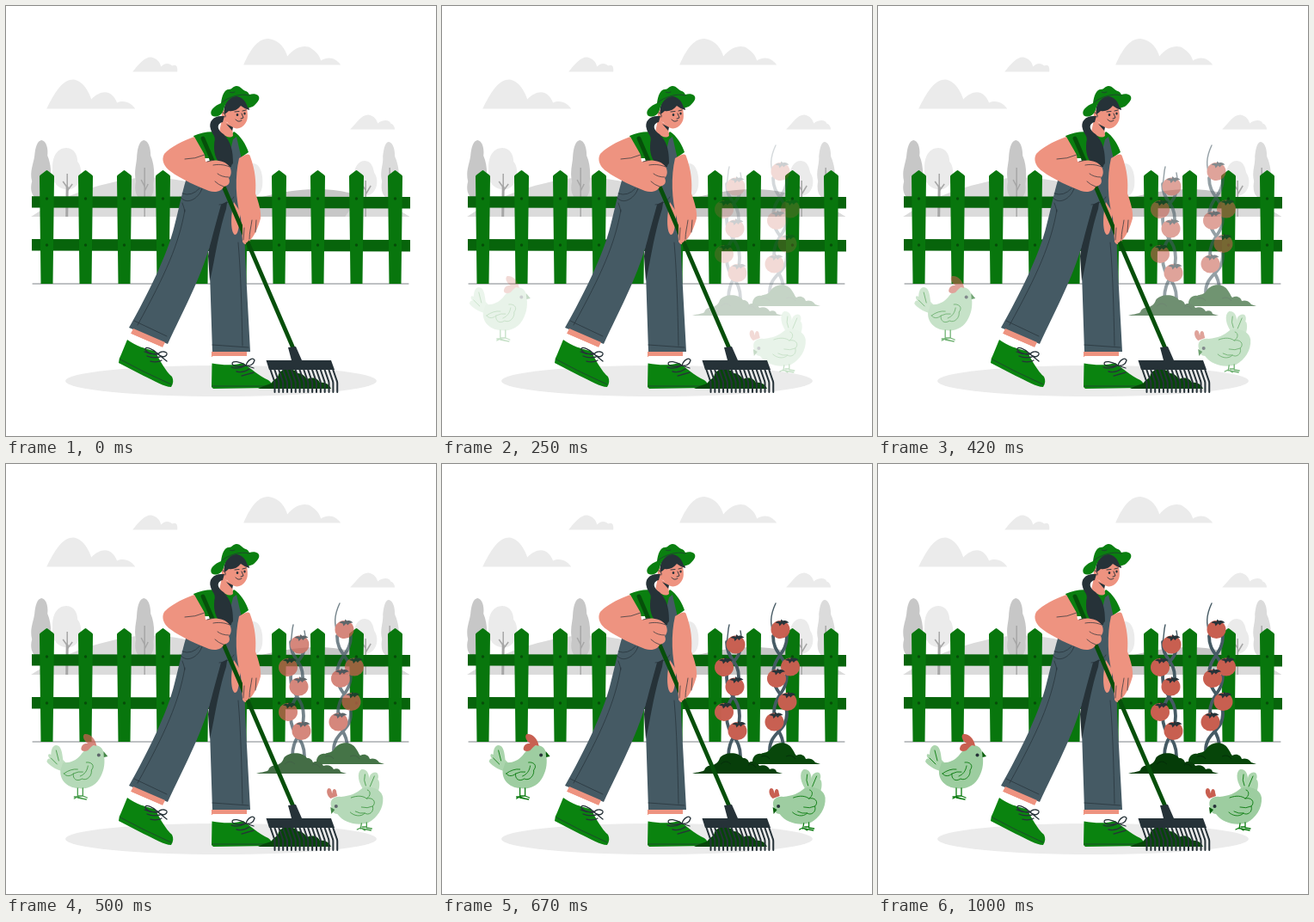
Recreate the animation shown at these times as an HTML page. Size 500 by 500 pixels, loop 1.04 s.

```html
<!DOCTYPE html>
<html lang="en">
<head>
<meta charset="utf-8">
<title>Gardener</title>
<style>
  html, body { margin: 0; width: 100%; height: 100%; overflow: hidden; background: #fff; }
  svg { display: block; width: 100%; height: 100%; }
  .line { fill: none; stroke: #263238; stroke-linecap: round; stroke-linejoin: round; }
  .wing { fill: none; stroke: #087a0d; stroke-linecap: round; stroke-linejoin: round; }
</style>
</head>
<body>
<svg viewBox="0 0 500 500">
  <defs>
    <g id="picket">
      <path fill="#08760d" d="M-8.500 198.500Q-8.500 197.200-7.500 196.500L-1 191.400Q0 190.700 1 191.400L7.500 196.500Q8.500 197.200 8.500 198.500L7 323H-7Z"/>
      <g fill="#064d09"><circle cy="224" r="1.700"/><circle cy="278" r="1.700"/></g>
    </g>
    <g id="tomato">
      <ellipse rx="11" ry="10.500" fill="#c85f50"/>
      <path fill="#263238" d="M-6-8C-4-10-1-10.500 0-9L1-12L3-10C6-11 8-10 10-8C7-8 5-7 4-5L2-7L-1-4L-2-7Z"/>
    </g>
  </defs>

  <g id="clouds" fill="#ebebeb" transform="translate(-.8 .4)">
    <path d="M48 119C57 101 66 85 79 85C90 86 97 99 100 108C108 100 117 97 124 103C128 107 129 110 130 112C139 108 147 113 151 119Z"/>
    <path d="M148 76C155 67 162 59 169 59C176 60 180 65 181 70C186 65 191 66 194 69Q201 66 200 76Z"/>
    <path d="M277 68C284 52 293 37 306 37.500C319 39 326 50 328 58C337 47 349 44 356 49C364 54 366 60 367 63C377 57 385 61 390 68Z"/>
    <path d="M401 143C409 135 414 126 422 126C429 127 432 132 433 136C440 131 447 132 448 136Q452 137 453 143Z"/>
  </g>

  <g id="landscape" transform="translate(-.8 0)">
    <g fill="#ebebeb">
      <path d="M71 165C81 165 84 175 84 181C91 188 89 210 76 213C62 215 53 205 55 190C54 176 60 165 71 165Z"/>
      <path d="M288 183C296 183 300 195 299 208C298 219 291 224 283 222L275 190Z"/>
      <path d="M418 180C426 180 428 189 429 194C435 202 433 218 420 221C407 222 403 210 406 198C405 187 411 180 418 180Z"/>
    </g>
    <path fill="#dbdbdb" d="M30 245C60 225 90 213 121 206C150 198 175 197 205 203L280 220L300 245Z"/>
    <path fill="#c7c7c7" d="M290 224C315 218 335 213 362 213C390 213 410 218 430 229L470 245H270Z"/>
    <path fill="#dbdbdb" d="M400 238C420 224 442 226 470 245H395Z"/>
    <g fill="#c7c7c7">
      <path d="M42 156C48 157 50 166 49 174C53 183 54 196 52 207C54 220 48 225 41 225C32 225 28 215 31 204C28 192 33 183 34 174C35 164 37 157 42 156Z"/>
      <path d="M161 156C167 157 169 166 169 174C173 183 174 196 172 207C174 220 168 225 161 225C153 225 149 215 152 204C149 192 153 183 153 174C154 164 156 157 161 156Z"/>
      <path fill="#dbdbdb" d="M446 158C451 159 453 167 453 175C457 184 459 196 457 207C458 220 453 224 447 224C439 224 436 214 438 204C435 192 440 184 439 175C440 165 442 158 446 158Z"/>
    </g>
    <g fill="none" stroke="#a6a6a6" stroke-width="1.500">
      <path stroke-width="3" d="M71.500 245L72 210"/><path d="M72 228V195M72 215L78 207M72 211L67 204"/>
      <path d="M162 245V188M162 215L166 207M162 210L158 202M419 245V203M419 219L425 209M419 214L414 207M447 245V188"/>
    </g>
  </g>

  <g id="fence">
    <path fill="#07640b" d="M30 221.300L470 222V235.500L30 234.500ZM30 271L470 272V285.500L30 284.500Z"/>
    <path class="line" stroke-width=".6" d="M31 323H468"/>
  </g>

  <ellipse cx="250" cy="436" rx="181" ry="18" fill="#ebebeb"/>

  <g id="plants">
    <g fill="none" stroke="#455a64" stroke-linecap="round">
      <path id="stems" stroke-width="3.800"/>
      <path stroke-width="1.400" d="M388 162C381 177 382 186 385 197M334 187C332 194 333 199 331 207M347 212Q349 203 347 194"/>
    </g>
    <g id="soil" fill="#053c08">
      <path d="M352 349C355 347 359 347 361 346C361 340 366 336 371 337C375 335 379 336 382 331C388 322 402 322 407 331C410 335 410 337 412 339C417 336 422 339 423 343C429 341 433 345 434 347L440 349Z" fill="#064509"/>
      <path d="M291 360C298 358 303 358 305 356C306 352 310 350 314 351C318 348 321 348 323 342C328 335 344 334 350 342C354 342 356 344 357 347C362 344 368 348 369 351C374 349 379 351 381 355C386 353 389 356 389 358L396 360Z"/>
      <path fill="none" stroke="#03280a" stroke-width=".7" d="M371 340Q378 338 381 343M400 340Q407 337 411 343M324 349Q330 343 336 349M356 350Q361 347 365 353"/>
    </g>
  </g>

  <g id="hen">
    <path fill="#abd5ad" d="M78 358C70 358 58 351 55 346C56 342 58 342 59 343C55 339 57 336 60 338C60 332 62 327 66 327C72 327 73 336 74 344L80 350Z"/>
    <path fill="#9dcda0" d="M74 347C81 348 89 345 94 339C99 332 105 327 112 327C118 328 121 332 121.500 337C123 347 122 355 118 363C113 374 102 379 91 377C78 376 70 367 71 356Z"/>
    <path fill="#c85f50" d="M95 331C96 325 100 325 103 325C98 322 96 316 99 314C105 313 112 319 113 328C108 326 107 329 103 333C99 335 95 334 95 331Z"/>
    <path fill="#065f0a" d="M121 334L126 340L121.500 341Z"/>
    <circle cx="115.500" cy="338.500" r="2" fill="#263238"/>
    <path class="wing" stroke-width=".9" d="M75 360C78 364 83 363 86 360C85 366 90 370 96 366C102 369 108 362 107 356C112 350 106 346 101 347M75 360Q83 354 91 355M86 360Q92 357 97 358M66 333L69 345M60 342L67 349M103 351C102 357 99 361 94 363"/>
    <path class="wing" stroke="#065f0a" stroke-width="1.300" d="M91 377L91 387M97 377L97 386M87 389L91 387L97 389M91 387L87 387M91 388L101 390M97 386L102 388M97 386L92 386"/>
  </g>

  <g id="pecker">
    <path fill="#abd5ad" d="M425 381C417 371 415 359 421 355C427 354 430 360 430 366C430 360 436 357 439 359C441 361 441 364 440 367C443 368 443 380 437 388Z"/>
    <path fill="#9dcda0" d="M386 399C383 390 390 386 397 387C408 386 415 383 422 377C433 373 445 379 446 388C447 400 439 412 429 417C417 421 401 418 393 407C389 407 387 404 386 399Z"/>
    <path fill="#c85f50" d="M384 388C380 384 380 378 383 377C386 377 386 380 387 383C387 376 392 377 392 382L393 386L385 389Z"/>
    <path fill="#065f0a" d="M385 399L386 407L390 402Z"/>
    <circle cx="391.500" cy="398" r="2" fill="#263238"/>
    <path class="wing" stroke-width=".9" d="M409 388C417 385 423 386 427 389C432 386 432 380 428 379M427 389C434 387 439 393 434 398C436 405 429 409 425 406C420 411 412 409 408 405M434 398Q428 401 421 399M425 406Q419 407 414 404M425 361Q423 368 426 374M436 363L431 375"/>
    <path class="wing" stroke="#065f0a" stroke-width="1.300" d="M421 418L420 424M427 417L427 423M416 425L420 423L425 426M422 424L432 426M427 423L433 424M427 422L422 422"/>
  </g>

  <g id="woman">
    <path fill="#0a7f10" d="M218 151C228 147 237 145 249 147L260 152L265 146C273 151 279 161 282 170L272 177L270 208H238C238 195 238 184 236 177H231Z"/>
    <path fill="#ee9380" d="M251 132L263 139L264 151Q261 154 255 151L248 147Z"/>
    <path fill="#455a64" d="M264 155L268 152L274 178L270 195H254L260 172Z"/>
    <path fill="#455a64" d="M213 202L268 190C272 220 278 250 278 290L284 402H240L236 280L245 225Z"/>
    <path fill="#263238" d="M258 222L250 229C244 252 237 270 235 291L237 320C242 300 246 267 256 236Z"/>
    <path fill="#455a64" d="M209 203C204 220 201 236 196 255C188 289 164 337 143 374L188 393C206 354 230 311 241 264L250 231L265 223V198L230 205Z"/>
    <path class="line" stroke-width=".7" d="M208 237C201 277 186 311 153 371M149 366L187 384M240 394L282 397M270 275C273 310 274 350 275 395M203 222C209 232 224 225 228 212M205 218Q216 222 225 212M248 231C257 230 262 227 265 222M205 229Q207 234 208 239"/>

    <g id="far-arm">
      <path fill="#ee9380" d="M271 177C278 173 283 170 284 175C290 191 291 205 290 218C294 229 297 239 296 247C293 258 289 267 284 272C282 278 276 279 275 273L273 246C267 226 266 198 271 177Z"/>
      <path fill="#ee9380" d="M265 228C261 243 261 263 266 266C271 266 271 252 273 240Z"/>
    </g>

    <g id="shoes">
      <path fill="#ee9380" d="M148 375L185 391L182 397L145 381ZM239 402H280V408H239Z"/>
      <path fill="#fff" d="M145 381L182 397L178 407L141 390ZM240 407H280V417H240Z"/>
      <path fill="#0a830f" d="M141 388C151 395 162 399 173 401C179 412 185 424 193 431Q196 437 192 443C184 443 173 436 160 430L131 415Q131 410 134 405ZM239.500 415.500C253 418 266 418 276 415C285 422 294 430 305 435Q311 439 307 444L241 445L239 443Z"/>
      <path class="line" stroke-width=".7" d="M133 411L160 425L192 440M240 442L307 442"/>
      <path class="line" stroke-width="1.300" d="M161 402Q169 406 177 404M164 407Q171 410 179 408M168 413Q175 415 181 412M176 404C171 399 162 395 162 399C163 404 172 405 177 405C180 400 188 402 187 405C185 410 179 407 177 405L187 413M262 420Q270 423 279 418M268 425Q276 427 283 422M274 430L288 426M279 418C272 413 263 412 263 416C265 421 274 419 279 418C281 411 288 408 289 412C288 417 283 419 279 418L288 421"/>
    </g>

    <path fill="#ee9380" d="M254 120C261 114 272 114 280 118C281 126 282 132 278 137C274 143 267 144 262 140L257 135C252 135 250 130 251 124Z"/>
    <path fill="#263238" d="M252 128C242 127 235 134 238 143C239 148 243 150 243 156C240 169 244 180 252 187Q258 190 264 183C264 169 262 158 253 149C243 142 247 136 252 135L254 128Z"/>
    <path fill="#263238" d="M254 126C252 112 260 103 270 104C277 105 282 112 283 121C279 120 276 118 273 116C269 121 264 123 259 122Q257 124 254 126ZM256 137L264 141L263 145Z"/>
    <path fill="#0a7f10" d="M239 127C236 121 243 116 250 113C251 104 254 97 259 97C263 97 264 93 268 93C273 93 275 98 279 99C282 100 282 102 283 103C290 101 296 104 294 109C290 116 285 119 281 118C279 111 275 106 268 105C259 106 255 113 253 121C250 129 243 130 239 127Z"/>
    <path class="line" stroke-width=".7" d="M251 112C259 106 272 101 283 104M260 100Q263 102 266 100"/>
    <g fill="#263238"><ellipse cx="269" cy="126.500" rx="1.300" ry="1.600"/><ellipse cx="277.500" cy="125" rx="1.200" ry="1.600"/></g>
    <path class="line" stroke-width=".9" d="M266 123L271 122.500M275 122L279 121M274 125L276 130L273 131M267 132Q270 136 274 133M252 124Q256 125 255 129"/>

    <path class="line" style="stroke:#064f0a" stroke-linecap="butt" stroke-width="4.800" d="M229 154L334 398"/>
    <path fill="#263238" d="M243 153C241 169 245 181 252 187L262 187C265 171 260 158 252 150Z"/>
    <path fill="#ee9380" d="M219 152C207 156 191 164 184 172C180 179 184 187 191 192C204 202 224 210 236 215C245 218 252 214 253 210C260 209 261 204 259 200C263 196 262 190 260 187C255 179 241 178 232 181L231 173Z"/>
    <path class="line" stroke-width=".7" d="M208 178Q220 178 231 173M260 187C253 184 246 184 241 185M259 199Q251 199 246 195M253 210Q247 208 243 204M234 181L242 179"/>
    <path fill="#ee9380" d="M275 245L288 247L284 270Q279 279 275 274Z"/>
    <path class="line" stroke-width=".7" d="M276 272L277 258M283 271C283 263 285 257 286 249M290 263L291 249"/>
  </g>

  <g id="rake">
    <path fill="#06460a" d="M293 445C302 440 305 441 309 438C312 433 316 434 317 428C320 421 335 420 339 427C345 427 348 431 350 434C356 431 363 433 365 438C371 437 376 440 378 445Z"/>
    <path fill="#263238" d="M328 397L337 396L344 412H378L382 423H306L302.500 412H332Z"/>
    <path id="tines" class="line" stroke-linecap="butt" stroke-width="2"/>
  </g>
</svg>
<script>
const SVG = 'http://www.w3.org/2000/svg';
const byId = id => document.getElementById(id);

function place(parent, symbol, x, y) {
  const node = document.createElementNS(SVG, 'use');
  node.setAttribute('href', '#' + symbol);
  node.setAttribute('x', x);
  node.setAttribute('y', y);
  parent.appendChild(node);
}

for (let i = 0; i < 10; i++) place(byId('fence'), 'picket', 47.5 + i * 45, 0);

const tomatoes = [
  [341.5, 210], [328, 236.5], [340.5, 259], [328, 288.5], [343.5, 310.5],
  [393.5, 192.5], [405, 236], [389, 249.5], [401.5, 276.5], [386.5, 300]
];
for (const [x, y] of tomatoes) place(byId('plants'), 'tomato', x, y);

// A stem swings between its points, upright at each of them
function stem(points) {
  let [x, y] = points[0];
  let path = `M${x} ${y}`;
  for (const [nextX, nextY] of points.slice(1)) {
    const middle = (y + nextY) / 2;
    path += `C${x} ${middle} ${nextX} ${middle} ${nextX} ${nextY}`;
    [x, y] = [nextX, nextY];
  }
  return path;
}
byId('stems').setAttribute('d', [
  [[331, 207], [345, 248], [331, 293], [347, 340]],
  [[347, 212], [331, 248], [346, 293], [333, 340]],
  [[385, 200], [401, 245], [386, 290], [397, 331]],
  [[401, 200], [385, 245], [401, 290], [381, 333]]
].map(stem).join(''));

const tine = i => {
  const x = 312.5 + i * 4.85;
  return `M${x - 6} 420L${x - 0.5} 436Q${x} 437 ${x} 439V449`;
};
byId('tines').setAttribute('d', Array.from({ length: 16 }, (_, i) => tine(i)).join(''));

const LOOP = 1040;
const FPS = 24;
const SLIDE = 30;

const bezier = (a, b, s) => 3 * (1 - s) ** 2 * s * a + 3 * (1 - s) * s * s * b + s ** 3;

// cubic-bezier(.36, -.01, .5, 1.38), which overshoots before settling
function ease(x) {
  if (x <= 0 || x >= 1) return x <= 0 ? 0 : 1;
  let low = 0, high = 1;
  for (let i = 0; i < 30; i++) {
    const mid = (low + high) / 2;
    if (bezier(0.36, 0.5, mid) < x) low = mid;
    else high = mid;
  }
  return bezier(-0.01, 1.38, low);
}

function render(ms) {
  const step = Math.floor((ms % LOOP + 4) * FPS / 1000);
  const progress = ease(Math.min(step / FPS, 1));
  const opacity = Math.max(0, Math.min(1, progress));
  for (const id of ['plants', 'hen', 'pecker']) byId(id).setAttribute('opacity', opacity);
  for (const id of ['hen', 'pecker']) {
    byId(id).setAttribute('transform', `translate(${SLIDE * (progress - 1)} 0)`);
  }
}

let start;
function tick(now) {
  start ??= now;
  render(now - start);
  requestAnimationFrame(tick);
}
render(0);
requestAnimationFrame(tick);
</script>
</body>
</html>
```
